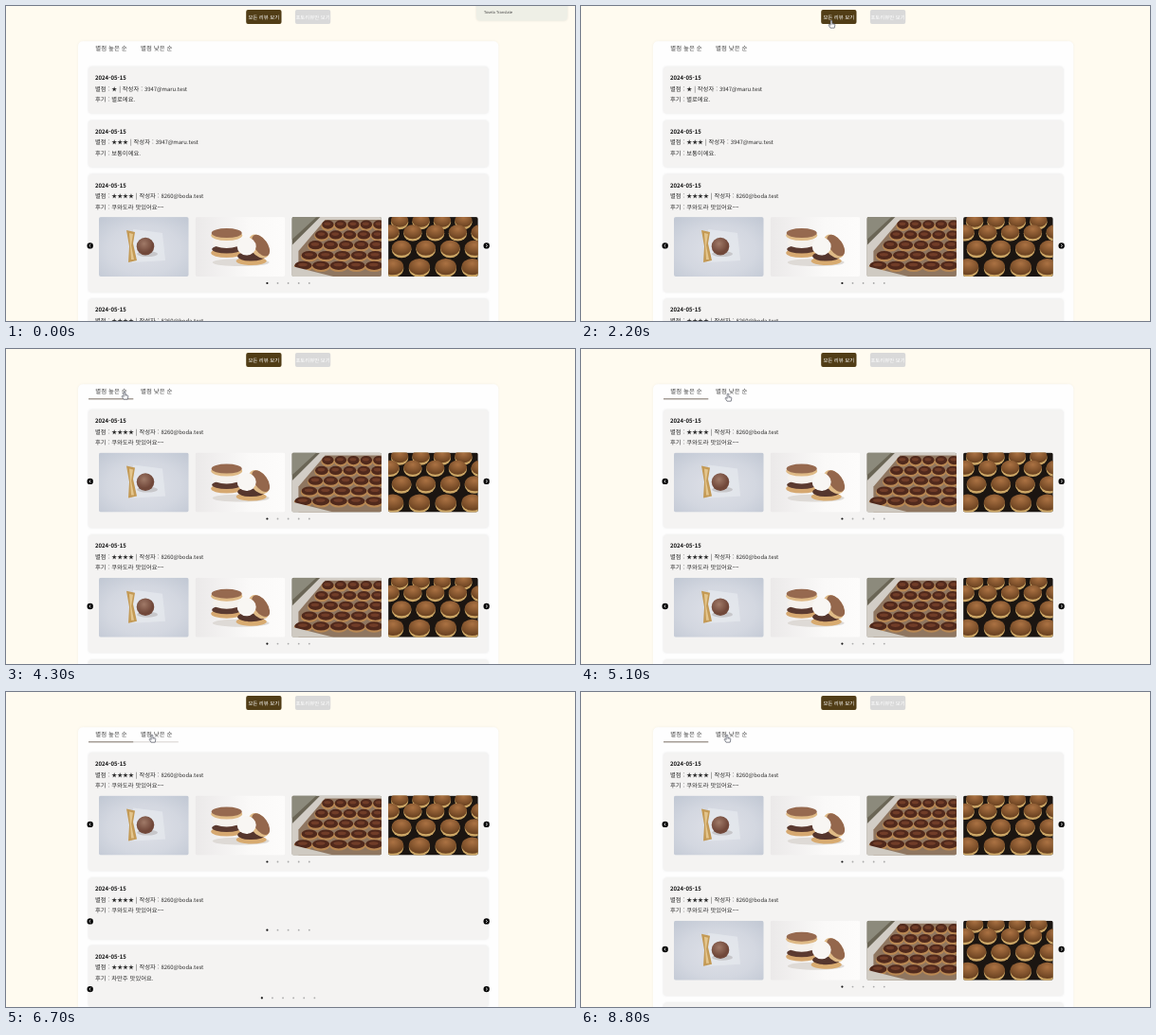
Animation, 600 px wide and 333 px high, one loop 8.9 s. Source, as an HTML page:

```html
<!DOCTYPE html>
<html lang="ko">
<head>
<meta charset="utf-8">
<title>리뷰 목록</title>
<style>
  html, body { margin: 0; width: 100%; height: 100%; overflow: hidden; background: #fffbf0; }
  svg { display: block; width: 100vw; height: 100vh; }
  text {
    font: 6.3px "Noto Sans CJK KR", "Noto Sans CJK", "Noto Sans", sans-serif;
    fill: #2c2c2c; word-spacing: .2px; text-rendering: geometricPrecision; white-space: pre;
  }
  .small { font-size: 5.9px; }
  .date { font-size: 6px; font-weight: 700; fill: #111; }
  .tab { font-size: 6.4px; fill: #444; }
  .label { font-size: 5.4px; fill: #fff; text-anchor: middle; word-spacing: 0; }
  .toast { font: 4px "Noto Sans", sans-serif; fill: #444; word-spacing: 0; }
  .soft { filter: drop-shadow(0 .7px .8px rgba(0, 0, 0, .1)); }
  .faint { filter: drop-shadow(0 0 1px rgba(0, 0, 0, .05)); }
</style>
</head>
<body>
<svg id="stage" viewBox="0 0 600 333" preserveAspectRatio="none"></svg>
<script>
const LOOP = 8900, STEP = 100;
const BROWN = '#513d16', GREY = '#d9d9d9';

// [start time, view, pressed button, active tab]
const STATES = [
  [0, 'all', 0, ''], [1100, 'photo', 1, ''], [2000, 'all', 0, ''],
  [4000, 'loading', 0, 'high'], [4200, 'sorted', 0, 'high'],
  [5300, 'all', 0, 'low'], [6600, 'loading', 0, 'switching'], [6800, 'sorted', 0, 'high']
];

// [time, x, y] of the pointer tip
const PATH = [
  [400, 548, 8], [900, 332, 15], [1300, 329, 16], [1500, 329, 16], [1900, 264, 15],
  [2600, 264, 15], [3400, 125, 45], [4400, 125, 45], [5000, 155, 47], [5500, 155, 47],
  [6200, 124, 46], [6500, 124, 46], [6700, 154, 45], [8900, 154, 45]
];

const rect = (x, y, w, h, fill, r = 0, more = '') =>
  `<rect x="${x}" y="${y}" width="${w}" height="${h}" rx="${r}" fill="${fill}" ${more}/>`;
const oval = (x, y, rx, ry, fill, more = '') =>
  `<ellipse cx="${x}" cy="${y}" rx="${rx}" ry="${ry}" fill="${fill}" ${more}/>`;
const path = (d, fill, more = '') => `<path d="${d}" fill="${fill}" ${more}/>`;
const text = (x, y, str, cls = '') => `<text x="${x}" y="${y}" class="${cls}">${str}</text>`;
const group = (id, body) => `<g id="${id}">${body}</g>`;
const at = (x, y, body) => `<g transform="translate(${x} ${y})">${body}</g>`;

const wrappedBall = () =>
  rect(0, 0, 95, 63, 'url(#mist)') +
  path('M36 13L67 17L70 46L35 48Z', '#eceef2', 'opacity=".55"') +
  path('M29 14L38 16L36 28L40 46L31 48L32 31Z', '#c49a55') +
  path('M32 17L36 18L34 30L37 45L34 45Z', '#e3c58d') +
  oval(51, 39, 11, 3, '#9c9796', 'opacity=".4"') +
  oval(49, 31, 9.3, 9.3, 'url(#ball)');

const creamBuns = () =>
  rect(0, 0, 95, 63, 'url(#paper)') +
  oval(48, 48, 30, 4, '#dedad6') +
  oval(33, 38, 16.5, 5, '#d6a870') + oval(33, 34, 15.5, 4.5, '#5b3a30') +
  oval(33, 27, 15, 6, '#f5f1ec') + oval(33, 19.5, 16.5, 5.5, '#dfba86') +
  oval(33, 17, 16, 5, '#96694f') +
  oval(59, 46.5, 16, 4.5, '#d8ab70') + oval(59, 41.5, 14.5, 5, '#55362d') +
  oval(67, 31, 9, 14, '#dfba86', 'transform="rotate(-35 67 31)"') +
  oval(69, 30, 7, 13, '#94674c', 'transform="rotate(-35 69 30)"') +
  oval(54, 31, 10, 9.5, '#f8f6f3');

function tray() {
  let out = rect(0, 0, 95, 63, '#6a6555') + path('M0 0H26L0 24Z', '#8c8a7c') +
    path('M30 0H95V63H0V30Z', '#d2cdc6') + path('M35 3H95V63H7V36Z', '#8f7660');
  for (let row = 0; row < 5; row++) {
    const rx = 7 + row * .7, left = 38 - row * 6.5, gap = 13.5 + row * 1.3;
    for (let x = left, y = 8 + row * 10.8; x < 102; x += gap) {
      out += oval(x, y + 1.4, rx, 5.4, '#b98853') + oval(x, y, rx - .8, 4.6, '#50291c') +
        oval(x - .5, y - .8, rx * .5, 1.8, '#713d28');
    }
  }
  return out + path('M0 52L44 63H0Z', '#cfcac2');
}

function darkBuns() {
  const rows = [[4, 12], [16, 2], [33, 14], [53, 5]];
  const bun = (x, y, r) => oval(x, y + 1.4, r, r * .84, '#cda766') +
    oval(x, y - .4, r, r * .78, 'url(#dome)');
  return rect(0, 0, 95, 63, '#1b1511') + rows.map(([y, left]) => {
    let row = '';
    for (let x = left; x < 100; x += 22 + y * .11) row += bun(x, y, 9 + y * .04);
    return row;
  }).join('');
}

const PHOTOS = [wrappedBall, creamBuns, tray, darkBuns];

const arrow = (x, y, dir) => oval(x, y, 3.2, 3.2, '#000') +
  path(`M${x - dir * .7} ${y - 1.5}L${x + dir * .9} ${y}L${x - dir * .7} ${y + 1.5}`,
    'none', 'stroke="#fff" stroke-width=".8"');

function slider(mid, dotY, dots) {
  let out = arrow(88.7, mid, -1) + arrow(506.7, mid, 1);
  for (let i = 0; i < dots; i++) {
    const x = 297.6 + (i - (dots - 1) / 2) * 11.1, r = i ? .9 : 1.1;
    out += oval(x, dotY, r, r, i ? '#aaa' : '#111');
  }
  return out;
}

const gallery = PHOTOS.map((_, i) => at(98 + i * 101.7, 45.3, `<use href="#photo${i}"/>`)).join('');

// media: '' none, 'photos' full slider, 'empty' collapsed slider
function card(top, stars, user, note, media = '', dots = 5) {
  const height = { '': 49.3, photos: 124.7, empty: 65 }[media];
  const small = s => `<tspan class="small">${s}</tspan>`;
  let body = rect(87, 0, 421.5, height, '#f4f3f2', 3.5, 'class="soft"') +
    text(94, 13.8, '2024-05-15', 'date') +
    text(94, 25.3, `별점 : ${small('★'.repeat(stars))} | 작성자 : ${small(user)}`) +
    text(94, 36.8, `후기 : ${note}`);
  if (media === 'photos') body += gallery + slider(75.6, 115.2, dots);
  if (media === 'empty') body += slider(46, 55.3, dots);
  return at(0, top, body);
}

const GUEST = '3947@maru.test', FAN = '8260@boda.test', TASTY = '쿠와도라 맛있어요~~';
const fanCard = (top, media = 'photos') => card(top, 4, FAN, TASTY, media);

const pager = rect(267, 330.5, 19, 10, '#e3e2df', 1.5) + rect(292.5, 330.5, 10, 10, BROWN, 1.5) +
  rect(309, 330.5, 19, 10, '#e3e2df', 1.5);

const VIEWS = {
  all: card(64.3, 1, GUEST, '별로에요.') + card(121, 3, GUEST, '보통이에요.') +
    fanCard(177.8) + fanCard(309.4),
  photo: fanCard(64.3) + fanCard(196.4) + pager,
  sorted: fanCard(64.3) + fanCard(196.4) + fanCard(328.4),
  loading: fanCard(64.3) + fanCard(196.4, 'empty') +
    card(268.1, 4, FAN, '차만주 맛있어요.', 'empty', 6)
};

const button = (i, x, label) =>
  rect(x, 4, 37.3, 15, GREY, 2, `id="button${i}"`) + text(x + 18.6, 13.6, label, 'label');

const defs = `<defs>
  <radialGradient id="mist" cy=".55" r=".75"><stop stop-color="#dfe1e8"/>
    <stop offset=".55" stop-color="#d3d7e0"/><stop offset="1" stop-color="#c0c7d3"/></radialGradient>
  <linearGradient id="paper" x2="1" y2="0"><stop stop-color="#ebe9e9"/>
    <stop offset=".6" stop-color="#faf9f8"/><stop offset="1" stop-color="#fdfcfb"/></linearGradient>
  <radialGradient id="ball" cx=".42" cy=".35"><stop stop-color="#a07a68"/>
    <stop offset="1" stop-color="#71483a"/></radialGradient>
  <radialGradient id="dome" cx=".5" cy=".3" r=".7"><stop stop-color="#ab7243"/>
    <stop offset="1" stop-color="#68401f"/></radialGradient>
  <clipPath id="frame"><rect width="94.5" height="63" rx="2"/></clipPath>
  ${PHOTOS.map((draw, i) => `<g id="photo${i}" clip-path="url(#frame)">${draw()}</g>`).join('')}
</defs>`;

const hand = `<g transform="scale(.85)">` +
  path('M-1 .8Q0 -.6 1 .8V4L3.9 4.8Q4.6 5 4.5 6L3.8 9.6H-1.2L-3.3 6.2Q-3.3 5 -2.2 5.4L-1 6.4Z',
    '#fff', 'stroke="#4a4e5e" stroke-width=".8" stroke-linejoin="round"') +
  path('M1 4V6M2.4 4.5V6.2', 'none', 'stroke="#4a4e5e" stroke-width=".4"') + '</g>';

document.getElementById('stage').innerHTML = defs +
  rect(0, 0, 600, 333, '#fffbf0') +
  rect(76, 37.3, 443.3, 310, '#fefefe', 5, 'class="faint"') +
  button(0, 253.2, '모든 리뷰 보기') + button(1, 304.9, '포토리뷰만 보기') +
  text(94.3, 47.2, '별점 높은 순', 'tab') + text(142, 47.2, '별점 낮은 순', 'tab') +
  rect(87, 52.4, 47.3, .9, '#6b5d52', 0, 'id="highLine"') +
  rect(134.5, 52.4, 47.3, .9, '#6b5d52', 0, 'id="lowLine"') +
  Object.entries(VIEWS).map(([name, body]) => group(name, body)).join('') +
  group('toast', rect(496, -6, 96, 21.5, '#eeefe6', 4, 'class="soft"') +
    text(504, 8.2, 'Tovela Translate', 'toast')) +
  group('pointer', hand);

const el = id => document.getElementById(id);
const show = (id, opacity) => {
  el(id).style.display = opacity > 0 ? '' : 'none';
  el(id).style.opacity = opacity;
};

function pointerAt(t) {
  const i = Math.max(1, PATH.findIndex(p => p[0] > t));
  const [t0, x0, y0] = PATH[i - 1], [t1, x1, y1] = PATH[i];
  const u = Math.max(0, (t - t0) / (t1 - t0)), k = u * u * (3 - 2 * u);
  return [x0 + (x1 - x0) * k, y0 + (y1 - y0) * k];
}

function render(t) {
  const [, view, pressed, tab] = STATES.filter(s => s[0] <= t).pop();
  for (const name in VIEWS) show(name, +(name === view));
  [0, 1].forEach(i => el('button' + i).setAttribute('fill', i === pressed ? BROWN : GREY));
  show('highLine', +(tab === 'high' || tab === 'switching'));
  show('lowLine', tab === 'low' ? 1 : tab === 'switching' ? .3 : 0);
  show('toast', Math.min(1, Math.max(0, (1100 - t) / 300)));
  show('pointer', +(t >= PATH[0][0]));
  el('pointer').setAttribute('transform', `translate(${pointerAt(t)})`);
}

const start = performance.now();
function tick() {
  const t = (performance.now() - start) % LOOP;
  render(Math.floor(t / STEP) * STEP);
  requestAnimationFrame(tick);
}
tick();
</script>
</body>
</html>
```
